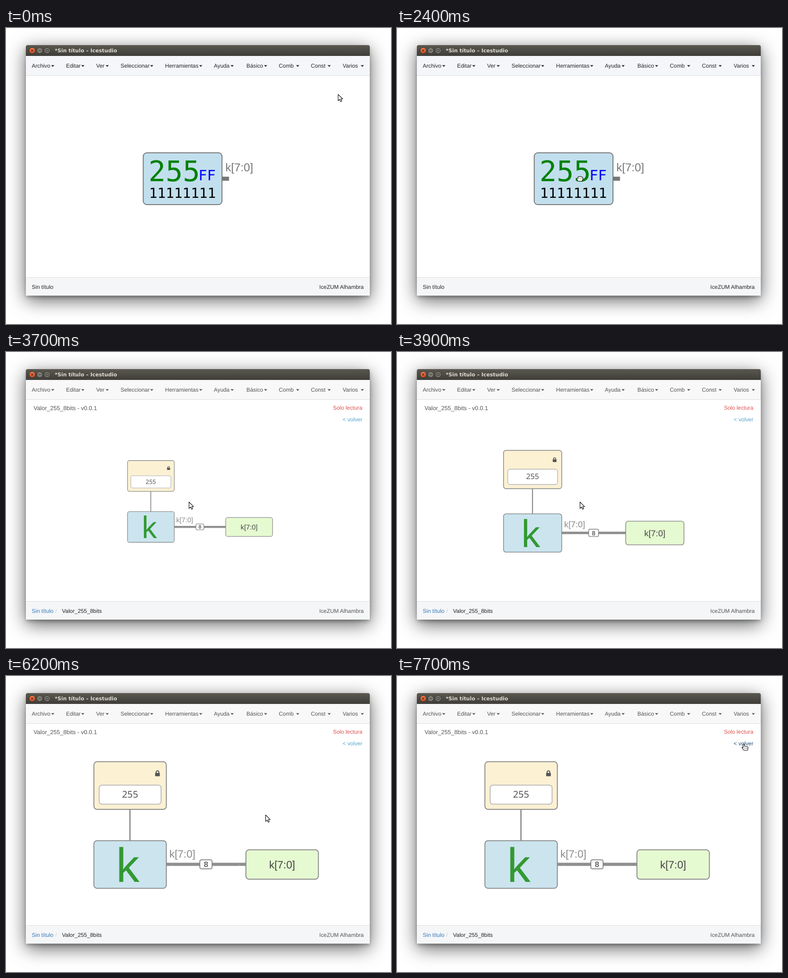
An HTML page for the animation above (8 s loop, 852x657 px).

```html
<!DOCTYPE html>
<html lang="es">
<head>
<meta charset="utf-8">
<title>Icestudio</title>
<style>
html, body { margin: 0; width: 100%; height: 100%; overflow: hidden; background: #fff; }
#shadow {
  position: absolute; left: 44px; top: 38px; width: 761px; height: 556px; border-radius: 4px 4px 0 0;
  box-shadow: 0 10px 40px rgba(0,0,0,.62), 0 4px 9px -1px rgba(0,0,0,.3);
}
svg { position: absolute; left: 0; top: 0; }
text { font: 12.3px "Liberation Sans", Arial, sans-serif; text-rendering: geometricPrecision; white-space: pre; }
.mono { font-family: "DejaVu Sans Mono", monospace; }
.noto { font-family: "Noto Sans", sans-serif; }
.mid { text-anchor: middle; }
.end { text-anchor: end; }
.box { stroke: #8a8a8a; stroke-width: 2; }
.pointer { fill: #fff; stroke: #000; stroke-width: 1.1; stroke-linejoin: round; }
</style>
</head>
<body>
<div id="shadow"></div>
<svg width="852" height="657" viewBox="0 0 852 657">
  <defs>
    <linearGradient id="title" x2="0" y2="1"><stop stop-color="#5a5850"/><stop offset="1" stop-color="#3e3d38"/></linearGradient>
    <linearGradient id="close" x2="0" y2="1"><stop stop-color="#f37c50"/><stop offset="1" stop-color="#dc4a1b"/></linearGradient>
  </defs>
  <rect x="44" y="62" width="761" height="532" fill="#fff"/>
  <path d="M44 62V42q0-4 4-4H801q4 0 4 4V62Z" fill="url(#title)"/>
  <g stroke="#35332e">
    <circle cx="58" cy="50" r="6.7" fill="url(#close)"/>
    <circle cx="74.5" cy="50" r="6.5" fill="#7c7a72"/>
    <circle cx="91" cy="50" r="6.5" fill="#7c7a72"/>
    <path d="M55.7 47.7l4.6 4.6m0-4.6l-4.6 4.6M71.5 50h6M88.5 47.5h5v5h-5Z" fill="none" stroke-width="1.2"/>
  </g>
  <text x="108" y="54" fill="#dfdbd2" style="font:bold 11.45px 'DejaVu Sans',sans-serif">*Sin título – Icestudio</text>

  <rect id="bar" x="44" y="62" width="761" height="43.5"/>
  <rect x="44" y="554" width="761" height="40" fill="#f5f6f8"/>
  <path d="M44 105.5H805M44 553.5H805" stroke="#dadbdd"/>
  <g id="menu"></g>

  <g id="top">
    <text x="57" y="578.5" fill="#262626">Sin título</text>
    <rect x="303.7" y="277" width="174.3" height="115" rx="8" fill="#c2dfed" stroke="#777" stroke-width="2"/>
    <g class="mono">
      <text class="mono" x="315.3" y="340" fill="green" style="font-size:63px">255</text>
      <text class="mono" x="426" y="338" fill="#00f" style="font-size:31.5px">FF</text>
      <text class="mono" x="316.6" y="377" style="font-size:30.7px">11111111</text>
    </g>
    <rect x="479" y="330" width="14.5" height="9" fill="#777"/>
    <text x="485.5" y="318" fill="#777" style="font-size:25.2px">k[7:0]</text>
  </g>

  <g id="inner">
    <text x="61" y="129" fill="#555" style="font-size:13.05px">Valor_255_8bits - v0.0.1</text>
    <text class="end" x="788.5" y="128.3" fill="#e0504d">Solo lectura</text>
    <text class="end" x="788.5" y="154.3" id="back">&lt; volver</text>
    <text x="57" y="578.5" fill="#337ab7">Sin título</text>
    <text x="109" y="578.5" fill="#ccc">/</text>
    <text x="124" y="578.5" fill="#222">Valor_255_8bits</text>
    <g id="zoom">
      <path d="M274.3 296V366" stroke="#8a8a8a" stroke-width="2.8"/>
      <path d="M355 418H531" stroke="#8f8f8f" stroke-width="7"/>
      <path d="M368.5 414.5v7M516.5 414.5v7" stroke="#a6a6a6"/>
      <g class="box">
        <rect x="194.5" y="190.3" width="160.3" height="105.7" rx="7" fill="#fcf1d3"/>
        <rect x="194.5" y="365.5" width="160.3" height="105.7" rx="7" fill="#cbe4ee"/>
        <rect x="531" y="385.8" width="160.3" height="65.2" rx="7" fill="#e5fad1"/>
        <rect x="429" y="408" width="27" height="20" rx="3.5" fill="#fff"/>
        <rect x="206.2" y="242.2" width="137" height="42.3" rx="6" fill="#fff" stroke="#bbb" style="stroke:#bbb"/>
      </g>
      <rect x="330" y="215" width="10.4" height="7.5" rx="1" fill="#555"/>
      <path d="M332.2 215.5v-2a3 3 0 0 1 6 0v2" fill="none" stroke="#555" stroke-width="1.9"/>
      <text class="noto mid" x="274.5" y="270" fill="#555" style="font-size:20.8px">255</text>
      <text class="noto" x="242" y="457" fill="#393" style="font-size:102px">k</text>
      <text x="361.5" y="402.5" fill="#8a8a8a" style="font-size:23.5px">k[7:0]</text>
      <text class="mid" x="442.5" y="424.3" fill="#666" style="font-size:17.5px;font-weight:bold">8</text>
      <text class="mid" x="611" y="427" fill="#444" style="font-size:23.6px">k[7:0]</text>
    </g>
  </g>

  <g id="cursor" class="pointer">
    <path id="arrow" d="M.5.5V14.8L3.9 11.6 6.2 16.6 8.7 15.5 6.5 10.7H10.6Z"/>
    <g id="grab">
      <path d="M-5 7.5V5.5Q-8 2.5-6 1L-4.3 1.5V-1.5Q-3.5-3.2-2-2.2-.5-4 1-2.6 2.8-3.6 4-2 6.8-2 6.8.5V3L5.2 7.5Z"/>
      <path d="M-1.8 0v1.8M1.2 0v1.8M4 .3v1.5" stroke-width=".8"/>
    </g>
    <g id="point">
      <path d="M-1.5 1.2Q0-.4 1.3 1.2V5.2L8 6.2Q9.8 6.8 9.5 8.5L8.4 14.5H.3L-3.8 9.2Q-4.6 7.2-2.8 7.3L-1.5 8.4Z"/>
      <path d="M1.7 8.8v2M4.2 8.8v2M6.7 8.8v2" stroke-width=".8"/>
    </g>
  </g>
</svg>
<script>
const el = id => document.getElementById(id);
const show = (id, on) => el(id).setAttribute('display', on ? 'inline' : 'none');

// label, text x, caret x
const items = [['Archivo', 57, 100], ['Editar', 133, 166.5], ['Ver', 199.5, 220.5], ['Seleccionar', 253.5, 319],
  ['Herramientas', 352, 427.5], ['Ayuda', 460, 497], ['Básico', 532, 571], ['Comb', 603.7, 642],
  ['Const', 674.7, 711.7], ['Varios', 745, 785]];
el('menu').innerHTML = items.map(([label, x, caret]) =>
  `<text x="${x}" y="88.3">${label}</text><path d="M${caret} 82.5h7l-3.5 3.7Z"/>`).join('') +
  '<text class="end" x="791.7" y="578.5">IceZUM Alhambra</text>';

// start time, number of 100 ms steps, target x and y
const moves = [[1300, 9, 444.5, 316], [2200, 3, 404.5, 332.5], [6200, 1, 574, 308],
  [6400, 5, 734, 237], [7100, 1, 764, 200], [7300, 3, 767, 157], [7700, 1, 767.5, 150.5]];

function pointerAt(t) {
  let x = 734.5, y = 146.8;
  for (const [start, steps, tx, ty] of moves) {
    if (t < start) break;
    const p = Math.min(1, (Math.floor((t - start) / 100) + 1) / steps);
    const e = p * (1.5 - p / 2);
    x += (tx - x) * e;
    y += (ty - y) * e;
  }
  return [x, y];
}

function draw(t) {
  const inside = t >= 3000, link = t >= 7700;
  show('top', !inside);
  show('inner', inside);
  el('bar').setAttribute('fill', inside ? '#f8f8f8' : '#f5f6f9');
  el('menu').setAttribute('fill', inside ? '#555' : '#262626');
  el('back').setAttribute('fill', link ? '#23527c' : '#56a5cb');

  const level = [3700, 3900, 4100].filter(start => t >= start).length;
  const scale = 1.244 ** (level - 3);
  el('zoom').setAttribute('transform', `translate(404.6 333.6) scale(${scale}) translate(-404.6 -333.6)`);

  const [x, y] = pointerAt(t);
  const grab = !inside && x < 478;
  show('grab', grab);
  show('point', link);
  show('arrow', !grab && !link);
  el('cursor').setAttribute('transform', `translate(${x} ${y})`);
}

function tick() {
  draw(performance.now() % 8000);
  requestAnimationFrame(tick);
}
tick();
</script>
</body>
</html>
```
